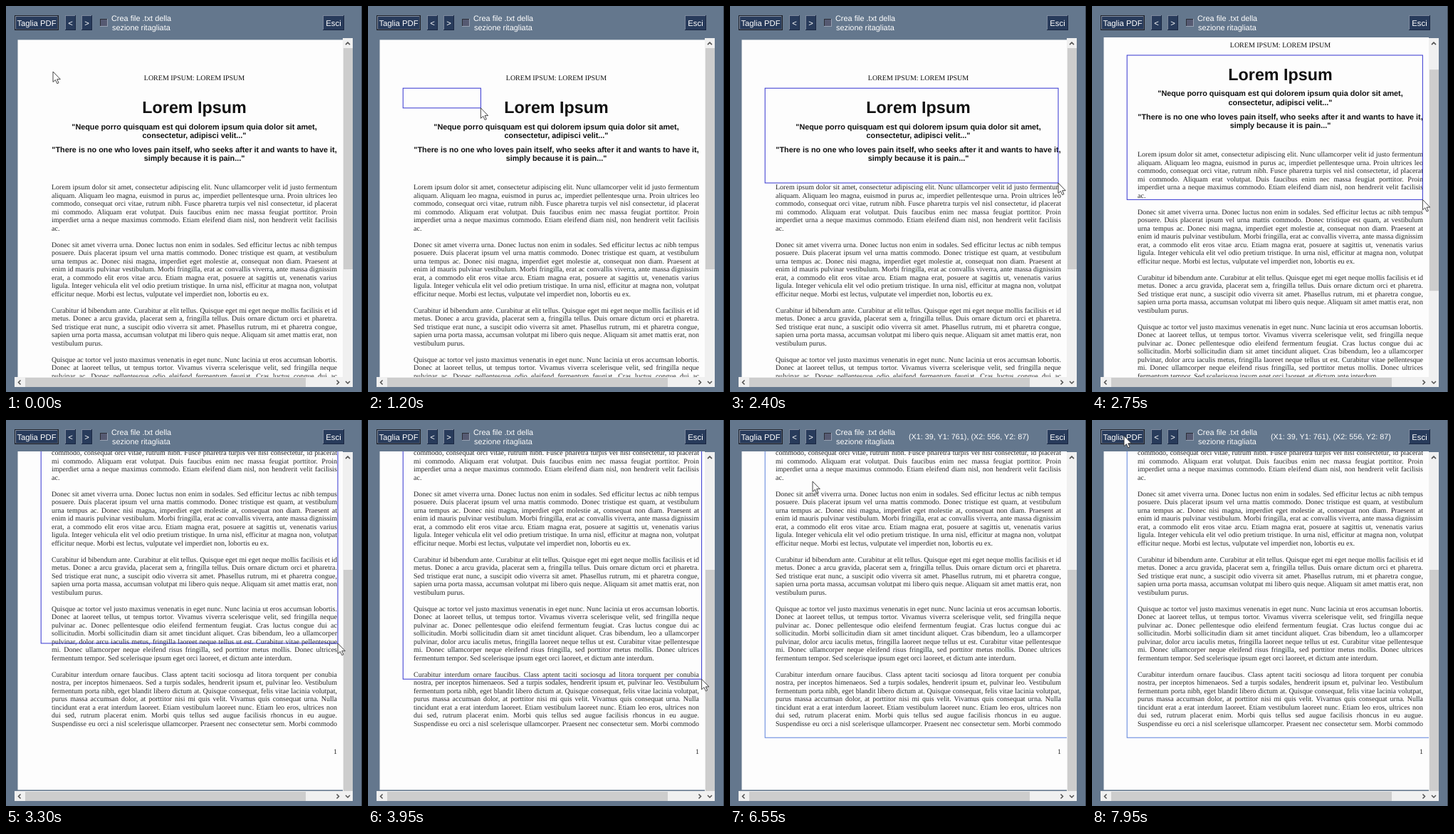
These frames come from a looping animation (500 by 541 pixels, 8 s). An HTML page with a canvas:

```html
<!DOCTYPE html>
<html lang="it">
<head>
<meta charset="utf-8">
<title>Taglia PDF</title>
<style>
html, body { margin: 0; width: 100%; height: 100%; overflow: hidden; background: #64778d; }
canvas { display: block; }
</style>
</head>
<body>
<canvas id="stage" width="500" height="541"></canvas>
<script>
const ctx = document.getElementById('stage').getContext('2d');
const SANS = '"Liberation Sans", Arial, sans-serif';
const SERIF = '"Liberation Serif", "Times New Roman", serif';
const LOOP = 8000, STEP = 50, MAX_SCROLL = 231;
const PRESS = 900, RELEASE = 5600;
const LEFT = 64, WIDTH = 401, MIDDLE = 264.5, LEADING = 11.5;
const START = [49.2, 115.2], END = [480, 445.2];
const INK = '#262626';

const lines = `Lorem ipsum dolor sit amet, consectetur adipiscing elit. Nunc ullamcorper velit id justo fermentum
aliquam. Aliquam leo magna, euismod in purus ac, imperdiet pellentesque urna. Proin ultrices leo
commodo, consequat orci vitae, rutrum nibh. Fusce pharetra turpis vel nisl consectetur, id placerat
mi commodo. Aliquam erat volutpat. Duis faucibus enim nec massa feugiat porttitor. Proin
imperdiet urna a neque maximus commodo. Etiam eleifend diam nisl, non hendrerit velit facilisis
ac.

Donec sit amet viverra urna. Donec luctus non enim in sodales. Sed efficitur lectus ac nibh tempus
posuere. Duis placerat ipsum vel urna mattis commodo. Donec tristique est quam, at vestibulum
urna tempus ac. Donec nisi magna, imperdiet eget molestie at, consequat non diam. Praesent at
enim id mauris pulvinar vestibulum. Morbi fringilla, erat ac convallis viverra, ante massa dignissim
erat, a commodo elit eros vitae arcu. Etiam magna erat, posuere at sagittis ut, venenatis varius
ligula. Integer vehicula elit vel odio pretium tristique. In urna nisl, efficitur at magna non, volutpat
efficitur neque. Morbi est lectus, vulputate vel imperdiet non, lobortis eu ex.

Curabitur id bibendum ante. Curabitur at elit tellus. Quisque eget mi eget neque mollis facilisis et id
metus. Donec a arcu gravida, placerat sem a, fringilla tellus. Duis ornare dictum orci et pharetra.
Sed tristique erat nunc, a suscipit odio viverra sit amet. Phasellus rutrum, mi et pharetra congue,
sapien urna porta massa, accumsan volutpat mi libero quis neque. Aliquam sit amet mattis erat, non
vestibulum purus.

Quisque ac tortor vel justo maximus venenatis in eget nunc. Nunc lacinia ut eros accumsan lobortis.
Donec at laoreet tellus, ut tempus tortor. Vivamus viverra scelerisque velit, sed fringilla neque
pulvinar ac. Donec pellentesque odio eleifend fermentum feugiat. Cras luctus congue dui ac
sollicitudin. Morbi sollicitudin diam sit amet tincidunt aliquet. Cras bibendum, leo a ullamcorper
pulvinar, dolor arcu iaculis metus, fringilla laoreet neque tellus ut est. Curabitur vitae pellentesque
mi. Donec ullamcorper neque eleifend risus fringilla, sed porttitor metus mollis. Donec ultrices
fermentum tempor. Sed scelerisque ipsum eget orci laoreet, et dictum ante interdum.

Curabitur interdum ornare faucibus. Class aptent taciti sociosqu ad litora torquent per conubia
nostra, per inceptos himenaeos. Sed a turpis sodales, hendrerit ipsum et, pulvinar leo. Vestibulum
fermentum porta nibh, eget blandit libero dictum at. Quisque consequat, felis vitae lacinia volutpat,
purus massa accumsan dolor, at porttitor nisi mi quis velit. Vivamus quis consequat urna. Nulla
tincidunt erat a erat interdum laoreet. Etiam vestibulum laoreet nunc. Etiam leo eros, ultrices non
dui sed, rutrum placerat enim. Morbi quis tellus sed augue facilisis rhoncus in eu augue.
Suspendisse eu orci a nisl scelerisque ullamcorper. Praesent nec consectetur sem. Morbi commodo`.split('\n');

// Pointer path: time, x, y
const path = [
  [0, 66, 92], [250, 65, 94], [800, ...START], [PRESS, ...START],
  [1850, 395, 203], [2400, 461, 248], [2550, 464, 255], [3100, 465, 300],
  [3300, 466, 313], [3600, 467, 325], [4700, 472, 445], [4850, 473, 446],
  [5100, 479, 446], [5300, ...END], [6000, ...END], [6550, 116, 86],
  [6850, 60, 40], [7300, 47, 27], [7700, 45, 23], [LOOP, 45, 22]
];

function pointer(t) {
  const i = path.findIndex(p => p[0] > t);
  const [t0, x0, y0] = path[i - 1], [t1, x1, y1] = path[i];
  const k = (t - t0) / (t1 - t0);
  return [x0 + (x1 - x0) * k, y0 + (y1 - y0) * k];
}

function box(x, y, w, h, color) {
  ctx.fillStyle = color;
  ctx.fillRect(x, y, w, h);
}

function text(str, x, y, font, color, align = 'left') {
  ctx.font = font;
  ctx.fillStyle = color;
  ctx.textAlign = align;
  ctx.fillText(str, x, y);
}

function justified(str, x, y, width, font) {
  ctx.font = font;
  const gap = (width - ctx.measureText(str).width) / (str.split(' ').length - 1);
  ctx.wordSpacing = gap + 'px';
  text(str, x, y, font, INK);
  ctx.wordSpacing = '0px';
}

function bevel(x, y, w, h, light, dark, fill) {
  box(x, y, w, h, dark);
  box(x, y, w - 1, h - 1, light);
  box(x + 1, y + 1, w - 2, h - 2, fill);
}

function button(label, x, w, focused) {
  if (focused) {
    box(x, 13, w, 21, '#1c1f28');
    bevel(x + 1, 14, w - 2, 19, '#8791a3', '#4a5568', '#283b5b');
  } else {
    bevel(x, 13, w, 21, '#7d889c', '#1a2742', '#283b5b');
  }
  text(label, x + w / 2, 27.7, '11.3px ' + SANS, '#fff', 'center');
}

function chevron(x, y, turns) {
  ctx.save();
  ctx.translate(x, y);
  ctx.rotate(turns * Math.PI / 2);
  ctx.beginPath();
  ctx.moveTo(-3, 1.5);
  ctx.lineTo(0, -1.5);
  ctx.lineTo(3, 1.5);
  ctx.strokeStyle = '#505050';
  ctx.lineWidth = 1.5;
  ctx.stroke();
  ctx.restore();
}

function toolbar(done) {
  button('Taglia PDF', 12, 62, true);
  button('<', 83, 15);
  button('>', 106, 15);
  button('Esci', 445, 30);
  bevel(132, 18, 11, 11, '#2c2e38', '#98a2b3', '#565a72');
  text('Crea file .txt della', 148, 20.7, '10.9px ' + SANS, '#fff');
  text('sezione ritagliata', 149, 34.2, '10.9px ' + SANS, '#fff');
  if (done) {
    text('(X1: 39, Y1: 761), (X2: 556, Y2: 87)', 251, 27.3, '10.8px ' + SANS, '#fff');
  }
}

function page() {
  box(16.5, 47.4, 496, 702, '#fdfdfd');
  const centered = (str, y, font) => text(str, MIDDLE, y, font, '#111', 'center');
  const bold = 'bold 10.83px ' + SANS;
  centered('LOREM IPSUM: LOREM IPSUM', 104.3, '10px ' + SERIF);
  centered('Lorem Ipsum', 150, 'bold 23.3px ' + SANS);
  centered('"Neque porro quisquam est qui dolorem ipsum quia dolor sit amet,', 172.5, bold);
  centered('consectetur, adipisci velit..."', 185, bold);
  centered('"There is no one who loves pain itself, who seeks after it and wants to have it,', 204.8, bold);
  centered('simply because it is pain..."', 217.3, bold);
  lines.forEach((line, i) => {
    const y = 257.2 + i * LEADING, font = '10px ' + SERIF;
    if (lines[i + 1] === '') text(line, LEFT, y, font, INK);
    else if (line) justified(line, LEFT, y, WIDTH, font);
  });
  text('1', LEFT + WIDTH, 699.3, '10px ' + SERIF, INK, 'right');
}

function scrollbars(scroll) {
  box(473, 45, 14, 489, '#f0f0f0');
  box(12, 520, 462, 14, '#f0f0f0');
  box(474, 59 + scroll / MAX_SCROLL * 151, 13, 310, '#cdcdcd');
  box(27, 521, 394, 13, '#cdcdcd');
  chevron(480, 52.6, 0);
  chevron(480, 527.5, 2);
  chevron(19, 527.5, 3);
  chevron(466, 527.5, 1);
}

function cursor(x, y) {
  const arrow = new Path2D('M0 0V14.5L3.4 11.5L5.8 16.7L8 15.7L5.7 10.7H10.3Z');
  ctx.save();
  ctx.translate(x, y);
  ctx.fillStyle = '#fff';
  ctx.fill(arrow);
  ctx.strokeStyle = '#333';
  ctx.lineWidth = 0.9;
  ctx.stroke(arrow);
  ctx.restore();
}

function draw(t) {
  const [x, y] = pointer(t);
  const done = t >= RELEASE;
  // The wheel moves the page in equal notches
  const notches = Math.min(5, Math.max(0, Math.ceil((t - 2650) / 100)));
  const scroll = MAX_SCROLL * notches / 5;

  box(0, 0, 500, 541, '#64778d');
  box(499, 0, 1, 541, '#3c4653');
  toolbar(done);

  ctx.save();
  ctx.beginPath();
  ctx.rect(13, 44, 460, 476);
  ctx.clip();
  ctx.translate(0, -scroll);
  page();
  if (t > PRESS) {
    const [right, bottom] = done ? END : [x, y];
    ctx.strokeStyle = done ? '#5a80dc' : '#3434d0';
    ctx.lineWidth = 1;
    ctx.strokeRect(START[0], START[1], right - START[0], bottom + scroll - START[1]);
  }
  ctx.restore();

  scrollbars(scroll);
  cursor(x, y);
}

ctx.textRendering = 'geometricPrecision';
const begin = performance.now();
function tick() {
  const t = (performance.now() - begin) % LOOP;
  draw(Math.floor(t / STEP) * STEP);
  requestAnimationFrame(tick);
}
tick();
</script>
</body>
</html>
```
